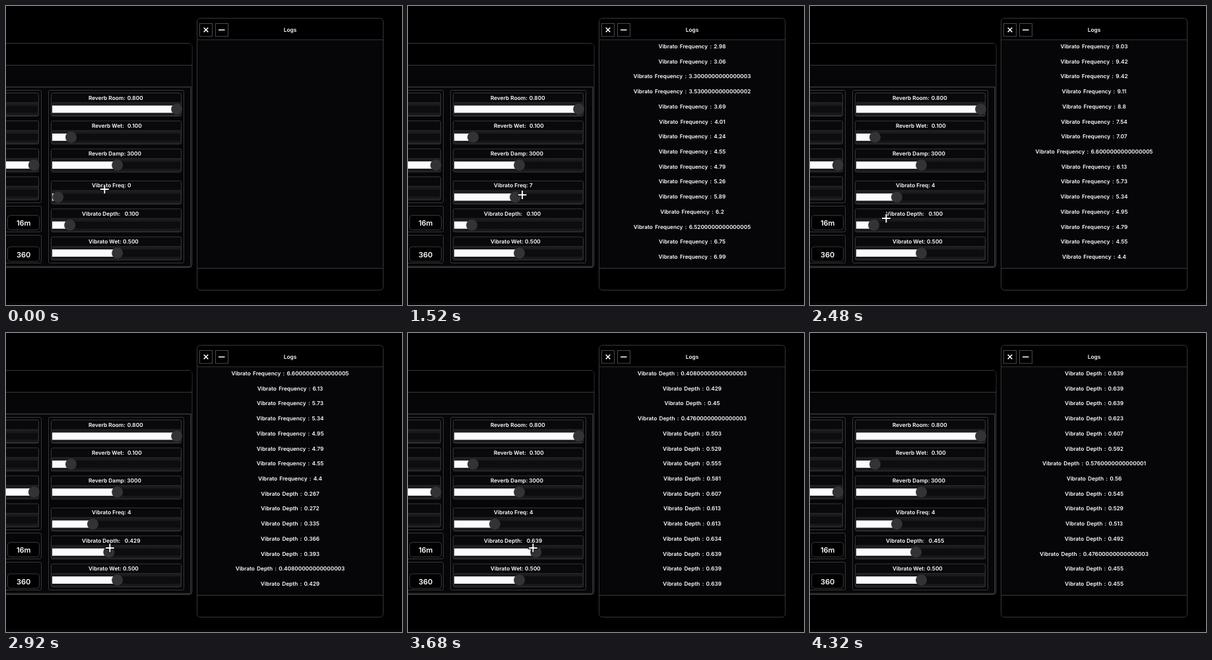
These frames come from a looping animation (600 px wide and 452 px high, 5 s). An HTML page:

```html
<!DOCTYPE html>
<html lang="en">
<head>
<meta charset="utf-8">
<title>Logs</title>
<style>
  html, body { margin: 0; width: 100%; height: 100%; overflow: hidden; background: #000; }
  svg { display: block; width: 600px; height: 452px; }
  text { font: 600 8.3px Inter, Roboto, sans-serif; fill: #fff; white-space: pre; text-rendering: geometricPrecision; }
  .mid { text-anchor: middle; }
  .row { font-size: 8.25px; word-spacing: 1.2px; }
  .big { font-size: 11px; }
</style>
</head>
<body>
<svg id="stage" viewBox="0 0 600 452">
  <defs>
    <linearGradient id="groove" x1="0" y1="0" x2="0" y2="1">
      <stop offset="0" stop-color="#1e1d20"/>
      <stop offset=".24" stop-color="#18171a"/>
      <stop offset=".26" stop-color="#0d0c0f"/>
      <stop offset=".77" stop-color="#0d0c0f"/>
      <stop offset=".79" stop-color="#161518"/>
      <stop offset="1" stop-color="#19181b"/>
    </linearGradient>
  </defs>
</svg>
<script>
const LOOP = 5000, STEP = 40, LEAD = 60, TRAVEL = 191, ROWS = 15, ROW_GAP = 22.71;
const BODY = '#060508', EDGE = '#37363a', SOFT = '#2a292c';
const stage = document.getElementById('stage');

function add(tag, attrs, text) {
  const el = document.createElementNS('http://www.w3.org/2000/svg', tag);
  for (const k in attrs) el.setAttribute(k, attrs[k]);
  if (text !== undefined) el.textContent = text;
  stage.append(el);
  return el;
}
const box = (x1, y1, x2, y2, fill, stroke = 'none', rx = 0) =>
  add('rect', { x: x1, y: y1, width: x2 - x1, height: y2 - y1, fill, stroke, rx });
const rule = (x1, x2, y) => add('path', { d: `M${x1} ${y}H${x2}`, stroke: EDGE });
// y is the middle of the capitals
const label = (x, y, text, cls = '') => add('text', { x, y: y + 3, class: cls }, text);

// Vertical middle of the tracks; the lower three sit a little further down
const trackY = i => 156 + i * 42.3 + (i > 2 ? 6 : 0);
const knobX = part => 78.7 + 180 * part;

function slider(left, right, cy, x) {
  box(left, cy - 24.5, right, cy + 10.5, '#09080b', EDGE, 2);
  box(left + 1.5, cy - 10, right - .5, cy + 9.5, 'url(#groove)', SOFT, 1);
  if (x === undefined) return;
  const fill = box(left + 1.5, cy - 5.5, left + 1.5, cy + 5.5, '#fbfaff');
  const knob = add('circle', { cy, r: 8.5, fill: '#333235' });
  const move = to => {
    fill.setAttribute('width', to - left - 1.5);
    knob.setAttribute('cx', to);
  };
  move(x);
  return move;
}

box(0, 448, 600, 452, '#080307');

// Mixer window
box(-10, 56.5, 282, 395.5, BODY, EDGE, 5);
box(-10, 57, 281.5, 89, '#000', 'none', 4);
rule(0, 282, 89.5);
box(-10, 122.5, 280, 394, BODY, EDGE).setAttribute('stroke-width', 1.5);

box(-10, 127.5, 53.5, 297.5, BODY, EDGE, 2);
for (let i = 0; i < 4; i++) slider(-150, 49.5, 156 + i * 42.2, i === 2 ? 42.3 : undefined);
for (const [top, bottom, y, text] of [[302.5, 341.5, 316.5, '16m'], [346.5, 388.5, 364, '360']]) {
  box(-10, top, 53.5, bottom, BODY, EDGE, 2);
  box(2.5, y, 50.5, y + 22, '#000', EDGE, 4);
  label(26.7, y + 12.5, text, 'mid big');
}

box(64.5, 127.5, 269.5, 388.5, BODY, EDGE, 2);
const controls = [
  ['Reverb Room:', 125, '0.800', 183.7, 1],
  ['Reverb Wet:', 130, '0.100', 184, .11],
  ['Reverb Damp:', 125, '3000', 183.2, .5],
  ['Vibrato Freq:', 130, '0', 184, 0],
  ['Vibrato Depth:', 115, '0.100', 179.7, .1],
  ['Vibrato Wet:', 125, '0.500', 177, .5]
].map(([name, x, value, valueX, part], i) => {
  const cy = trackY(i), move = slider(68.5, 265.5, cy, knobX(part));
  label(x, cy - 17.5, name);
  return { move, value: label(valueX, cy - 17.5, value) };
});

// Log window
box(289.5, 18.5, 571.5, 429.5, '#000', EDGE, 5);
box(290, 51, 571, 396.5, BODY);
rule(289.5, 571.5, 51);
rule(289.5, 571.5, 396.5);
for (const x of [293.5, 317.5]) box(x, 26.5, x + 19, 46, '#000', '#4a494c');
add('path', { d: 'M299.7 32.8l6.6 6.6m0 -6.6l-6.6 6.6M322 36.2h9.5', stroke: '#fff', 'stroke-width': 1.5 });
label(430.5, 36, 'Logs', 'mid');

const rows = Array.from({ length: ROWS }, () => label(430.5, 0, '', 'mid row'));
const cursor = add('g', {});
for (const [stroke, width, arm] of [['#000', 4, 7.5], ['#fff', 2, 6.5]])
  cursor.append(add('path', { d: `M${-arm} 0H${arm}M0 ${-arm}V${arm}`, stroke, 'stroke-width': width }));

// Straight run between [time, value] key points, held at both ends
function along(keys, t) {
  const i = keys.findIndex(k => k[0] > t);
  if (i === 0) return keys[0][1];
  if (i < 0) return keys[keys.length - 1][1];
  const [t0, v0] = keys[i - 1], [t1, v1] = keys[i];
  return v0 + (v1 - v0) * (t - t0) / (t1 - t0);
}

// Hand movement: x in slider units, y in stage pixels
const handX = [
  [100, 75], [480, 31], [600, 38], [920, 38], [960, 39], [1000, 42], [1080, 47], [1240, 61],
  [1320, 67], [1360, 75], [1440, 83], [1520, 89], [1600, 104], [1720, 120], [1840, 120],
  [1920, 112], [1960, 96], [2080, 78], [2200, 63], [2320, 56], [2540, 39],
  [2680, 51], [2720, 52], [2760, 64.3], [2840, 74.9], [2920, 82], [3080, 86], [3320, 116],
  [3400, 117], [3440, 121], [3600, 122], [3680, 122], [3800, 113], [4000, 98], [4120, 87]
];
const handY = [[100, 277], [480, 285.5], [2380, 285.5], [2540, 321], [2640, 325], [4220, 325], [4340, 408]];

const freq = { name: 'Vibrato Frequency', ctl: controls[3], max: 15, unit: .01, start: 0, digits: 0 };
const depth = { name: 'Vibrato Depth', ctl: controls[4], max: 1, unit: .001, start: .1, digits: 3 };

// While dragging, every step logs the slider value, snapped to its unit
const drags = [
  [freq, 760, 760], [freq, 920, 1240], [freq, 1320, 1760], [freq, 1880, 2320],
  [depth, 2680, 2920], [depth, 3080, 3440], [depth, 3600, 4160]
];
const logs = [];
for (const [param, from, to] of drags)
  for (let time = from; time <= to; time += STEP) {
    const part = Math.round(along(handX, time)) / TRAVEL;
    const value = Math.round(part * param.max / param.unit) * param.unit;
    logs.push({ param, value, time, text: `${param.name} : ${value}` });
  }

function draw(t) {
  const seen = logs.filter(l => l.time <= t);
  const shown = seen.slice(-ROWS);
  const top = seen.length < ROWS ? 71.3 : 61;
  rows.forEach((row, i) => {
    row.textContent = shown[i] ? shown[i].text : '';
    row.setAttribute('y', top + i * ROW_GAP + 3);
  });
  for (const p of [freq, depth]) {
    const last = seen.filter(l => l.param === p).pop();
    const value = last ? last.value : p.start;
    p.ctl.move(knobX(value / p.max));
    p.ctl.value.textContent = value.toFixed(p.digits);
  }
  const x = knobX(along(handX, t + LEAD) / TRAVEL), y = along(handY, t + LEAD);
  cursor.setAttribute('transform', `translate(${x} ${y})`);
  cursor.setAttribute('visibility', t < 4320 ? 'visible' : 'hidden');
}

const begin = performance.now();
function tick() {
  const t = (performance.now() - begin) % LOOP;
  draw(Math.floor(t / STEP) * STEP);
  requestAnimationFrame(tick);
}
tick();
</script>
</body>
</html>
```
